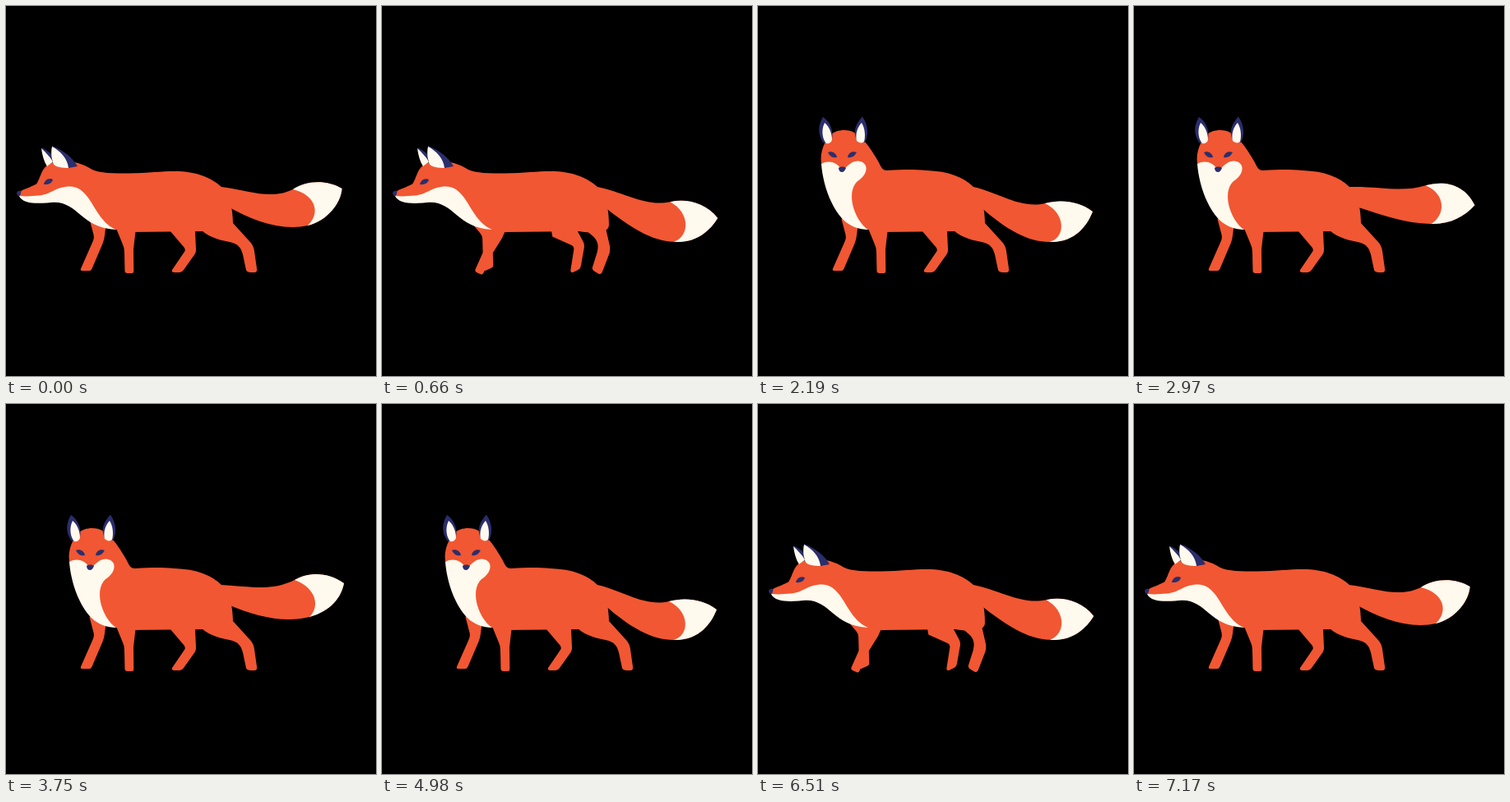
These frames come from a looping animation (450 px wide and 450 px high, 7.2 s). An HTML page:

```html
<!DOCTYPE html>
<html lang="en">
<head>
<meta charset="utf-8">
<title>Fox</title>
<style>
  html, body { margin: 0; width: 100%; height: 100%; overflow: hidden; background: #000; }
  svg { display: block; width: 100%; height: 100%; }
  .orange { fill: #f15732; }
  .cream { fill: #fff9ee; }
  .navy { fill: #2b2e6c; }
</style>
</head>
<body>
<svg id="stage" viewBox="0 0 450 450"></svg>
<script>
const LOOP = 7200, STEP = 30, TAIL_PERIOD = 1800, WALK = 1200;
const stage = document.getElementById('stage');

function add(cls, d = '', parent = stage) {
  const el = document.createElementNS('http://www.w3.org/2000/svg', cls === 'g' ? 'g' : 'path');
  if (cls !== 'g') {
    el.setAttribute('class', cls);
    el.setAttribute('d', d);
  }
  return parent.appendChild(el);
}

const numbers = s => s.match(/[\d.]+/g).map(Number);
const smooth = (a, b, t) => {
  const x = Math.min(1, Math.max(0, (t - a) / (b - a)));
  return x * x * (3 - 2 * x);
};

// Tail: outline and colour-boundary points at moments of one wag
const wag = [
  [0, '298 225 322 236 349 223 365 212 390 211 408.5 222 408 238 392 261 367 267 335 274 300 261 383 252 377 230'],
  [390, '295 228 320 247 349 240 368 235 390 237 407 250 401 266 386 288 355 287 328 287 302 272 375 281 374 252'],
  [860, '297 225 322 240 352 233 374 228 397 236 410 258 399 272 381 284 357 282 330 282 300 264 376 273 376 246'],
  [1260, '300 218 325 225 355 215 378 208 402 212 415 237 402 252 385 261 363 261 333 262 300 252 380 250 380 225'],
  [1620, '300 222 322 228 351 214 368 204 392 204 411 218 408 235 395 252 369 259 338 267 303 258 382 247 378 224']
].map(([at, s]) => ({ at, pts: numbers(s) }));

function wagKey(i) {
  const n = wag.length, turn = Math.floor(i / n), key = wag[i - turn * n];
  return { at: key.at + turn * TAIL_PERIOD, pts: key.pts };
}

// Smooth periodic curve through the wag poses
function tailPoints(t) {
  const u = t % TAIL_PERIOD;
  let i = wag.length - 1;
  while (wag[i].at > u) i--;
  const [a, b, c, d] = [-1, 0, 1, 2].map(k => wagKey(i + k));
  const h = c.at - b.at, x = (u - b.at) / h, x2 = x * x, x3 = x2 * x;
  return b.pts.map((p, j) => {
    const q = c.pts[j];
    const m0 = (q - a.pts[j]) / (c.at - a.at) * h;
    const m1 = (d.pts[j] - p) / (d.at - b.at) * h;
    return (2 * x3 - 3 * x2 + 1) * p + (x3 - 2 * x2 + x) * m0
      + (3 * x2 - 2 * x3) * q + (x3 - x2) * m1;
  });
}

const tail = add('orange'), tailTip = add('cream');

function drawTail(t) {
  const p = tailPoints(t).map(v => v.toFixed(2));
  const part = (a, b) => p.slice(a, b).join(' ');
  tail.setAttribute('d', `M262 220C${part(0, 18)} ${part(18, 22)} 270 244Z`);
  tailTip.setAttribute('d', `M${part(4, 6)}C${part(6, 18)} ${part(22, 26)} ${part(4, 6)}Z`);
}

// Legs: hip, foot, swing in degrees, half of the stride in which the foot is lifted
const legs = [
  { hip: [116, 250], foot: [97, 322], swing: -26, lift: -1,
    d: 'M101.5 259L106.5 278Q107.5 282 106 285.500L91 319.500Q90 322 93 322L101 322Q103.500 322 104.500 319.500L117.500 289Q119.500 284 120 279L121.500 267L115 250Z' },
  { hip: [145, 250], foot: [150, 325], swing: 26, lift: 1,
    d: 'M133 268L142 290Q144 294 144 299L144.500 322.500Q145 325 148 325L153 325Q155.300 325 155.300 322L155 296L157.500 274L157 250L135 250Z' },
  { hip: [214, 260], foot: [208, 324], swing: -26, lift: -1,
    d: 'M200 274L217 294Q218.500 296.500 217 299L202 321Q201 324 205 324L211 324Q214 324 216 321L229.500 302Q231.500 299 231 295L230 274L226 255L205 255Z' },
  { hip: [262, 255], foot: [299, 324], swing: 30, lift: 1,
    d: 'M238 273C250 283 262 285 274 287.500C283 289.500 286 295 288 302L292 321Q293 324 298 324L303 324Q306 323 305 319L302 298Q301 291 296 286L276 264L272 245L240 250Z' }
];
for (const leg of legs) leg.el = add('orange', leg.d);

function drawLegs(p) {
  const s = (1 - Math.cos(2 * Math.PI * p)) / 2;
  for (const { el, hip: [hx, hy], foot: [fx, fy], swing, lift } of legs) {
    const a = swing * s, r = a * Math.PI / 180;
    const y = hy + (fx - hx) * Math.sin(r) + (fy - hy) * Math.cos(r);
    const up = 6 * Math.max(0, lift * Math.sin(2 * Math.PI * p));
    el.setAttribute('transform', `translate(0 ${fy - y - up}) rotate(${a} ${hx} ${hy})`);
  }
}

// Body and head: colour, side view, view towards the viewer
const upper = add('g');
const morphs = [
  ['orange',
    'M276 266C276 277 258 277 240 274L150 275L134 272C118 266 100 240 80 232C60 231 35 236 17 233C13 224 20 225 37 216.500C43 209 42 194 58 190.500C72 187 90 189 104 198.500C114 203.500 130 203.500 150 203.500C175 203 188 201 205 201C232 201 250 209 262 220C272 230 276 245 276 266Z',
    'M276 266C276 277 258 277 240 274L150 275L134 272C115 262 100 245 92 225C84 215 80 200 77 191C75 178 81 164 88 157C94 150 110 149 117 154C130 162 138 175 145 187C150 195 150 200 157 200C175 199 188 198.500 205 200C232 201 250 208 262 220C272 230 276 245 276 266Z'],
  ['navy', 'M43 172C47 174 52 177 56 181L56 188C52 184 47 179 43 172Z',
    'M79 135C88 141 92 152 90 162L80 167C72 156 73 145 79 135Z'],
  ['cream', 'M43 173C44 181 46 189 50 195C52 193 55 191 57 190C56 186 50 180 43 173Z',
    'M81 142C76 152 79 163 83 167C86 168 89 166 90 163C90 155 87 147 81 142Z'],
  ['navy', 'M56 170C66 174 80 182 87 195L76 197C66 195 57 190 56 170Z',
    'M127 134.500C134 145 135 156 130 166L120 163C115 153 119 143 127 134.500Z'],
  ['cream', 'M56 171C54 180 56 188 58 192.500C61 196 68 197 76 197C75 186 66 176 56 171Z',
    'M126 142C121 147 118 156 120 164C123 167 127 167 129 165C131 158 130 148 126 142Z'],
  ['cream',
    'M16 231C20 240 34 240.500 50 239.500C88 233 88 270 134 272C124 268 117 260 110 249C101 234 93 219.500 78 219.500C60 219.500 56 229 40 230.500C32 231 26 232 16 231Z',
    'M77 192C78 206 82 224 90 240C100 260 112 271 134 272C116 260 105 222 124 211C135 202 134 190 122 188.500C112 188 107 198 102 200C98 192 88 186 77 192Z'],
  ['navy', 'M13 227C14 224.500 17 224.500 18.500 225C18 228 18 230 16 231C14 231 13 229 13 227Z',
    'M98 197C100 195 105 195 107 197C106 200 104 202 102 202C100 202 98 200 98 197Z'],
  ['navy', 'M38 218C38 218 38 218 38 218C38 218 38 218 38 218Z',
    'M85 178C89 176 95 178 96 184C92 185 88 184 85 178Z'],
  ['navy', 'M57 211C52 208.500 47 211.500 46 217C51 217.500 56 216 57 211Z',
    'M120 178C115 176 110 178 109 184C114 185 117 183 120 178Z']
].map(([cls, side, front]) => ({ el: add(cls, side, upper), side, from: numbers(side), to: numbers(front) }));

function drawUpper(k, p) {
  for (const { el, side, from, to } of morphs) {
    let i = 0;
    el.setAttribute('d', side.replace(/[\d.]+/g, () => {
      const v = from[i] + (to[i] - from[i]) * k;
      i++;
      return v.toFixed(2);
    }));
  }
  upper.setAttribute('transform', `translate(0 ${0.6 * (1 - Math.cos(4 * Math.PI * p))})`);
}

// The action plays forwards, then backwards
function draw(now) {
  const step = Math.floor(now % LOOP / STEP);
  const t = Math.min(step, LOOP / STEP - 1 - step) * STEP;
  const p = Math.min(1, t / WALK);
  drawTail(t);
  drawLegs(p);
  drawUpper(smooth(720, 1260, t), p);
}

let start;
function tick() {
  const now = performance.now();
  start ??= now;
  draw(now - start);
  requestAnimationFrame(tick);
}
tick();
</script>
</body>
</html>
```
